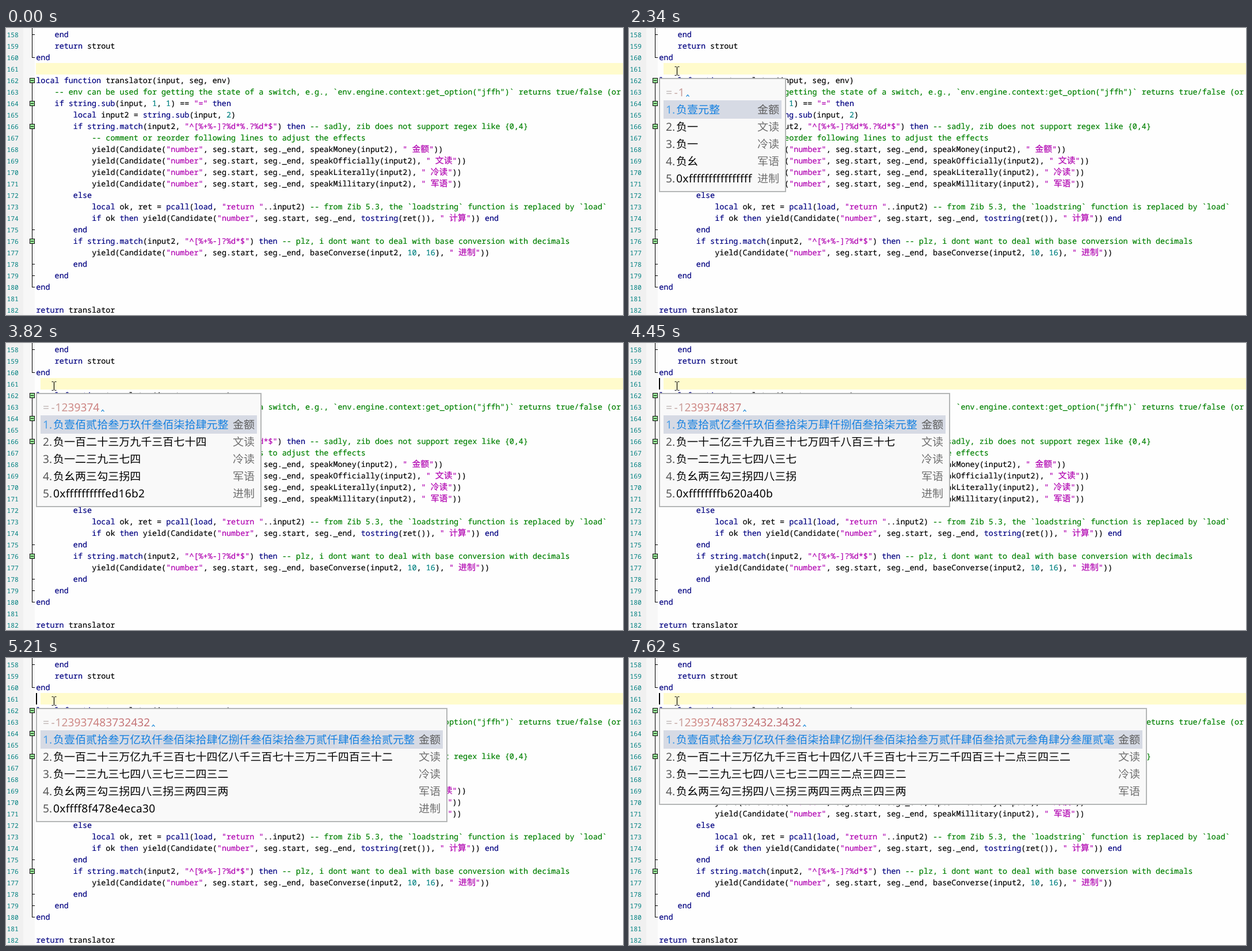
Recreate the animation shown at these times as an HTML page. Size 1072 by 500 pixels, loop 8000 ms.

```html
<!DOCTYPE html>
<html lang="zh-CN">
<head>
<meta charset="utf-8">
<title>Number translator</title>
<style>
  html, body { margin: 0; width: 100%; height: 100%; overflow: hidden; background: #fefefe; }
  svg { display: block; width: 1072px; height: 500px; }
  text { white-space: pre; text-rendering: geometricPrecision; }
  .code { font: 13.45px "Noto Sans Mono", "DejaVu Sans Mono", monospace; color: #000; }
  .code, .code tspan { fill: currentColor; stroke: currentColor; stroke-width: .2; }
  .num { font: 11.3px "Noto Sans Mono", "DejaVu Sans Mono", monospace; fill: #008080; }
  .han { font: 14.9px "Noto Sans CJK SC", "Noto Sans CJK", sans-serif; }
  .key { color: #000080; }
  .str { color: #b000b0; }
  .com { color: #008000; }
  .val { color: #008080; }
  .pop { font: 19.2px "Noto Sans", "Open Sans", sans-serif; }
  .cand { font: 19.04px "Noto Sans CJK SC", "Noto Sans CJK", sans-serif; }
  .hex { letter-spacing: .27px; }
</style>
</head>
<body>
<svg viewBox="0 0 1072 500" xmlns="http://www.w3.org/2000/svg">
  <defs>
    <linearGradient id="ink" gradientUnits="userSpaceOnUse" x1="64" y1="0" x2="300" y2="0">
      <stop offset="0" stop-color="#bcbcbc"/>
      <stop offset=".07" stop-color="#c4a8a4"/>
      <stop offset=".2" stop-color="#d08a86"/>
      <stop offset="1" stop-color="#bc646c"/>
    </linearGradient>
  </defs>
  <rect width="1072" height="500" fill="#fefefe"/>
  <rect width="30" height="500" fill="#f0f0f0"/>
  <rect x="30" width="20" height="500" fill="#f7f7f7"/>
  <rect x="52" y="61" width="1020" height="20" fill="#fffbcc"/>
  <g id="fold"></g>
  <g id="code"></g>
  <rect id="cell" x="52" y="61" width="8" height="20" fill="#fefefe"/>
  <rect id="caret" x="52" y="61" width="2" height="20"/>
  <g id="popup"></g>
  <path id="mouse" d="M-4 -7.5h3M1 -7.5h3M0 -7V7M-4 7.5h3M1 7.5h3" fill="none" stroke="#000" stroke-width="1.2"/>
</svg>
<script>
const LOOP = 8000, FIRST = 158, COL = 8.07, LEFT = 52.3;
const $ = id => document.getElementById(id);
const esc = s => s.replace(/&/g, '&amp;').replace(/</g, '&lt;');

const SOURCE = `    end
    return strout
end

local function translator(input, seg, env)
    -- env can be used for getting the state of a switch, e.g., \`env.engine.context:get_option("jffh")\` returns true/false (or
    if string.sub(input, 1, 1) == "=" then
        local input2 = string.sub(input, 2)
        if string.match(input2, "^[%+%-]?%d*%.?%d*$") then -- sadly, zib does not support regex like {0,4}
            -- comment or reorder following lines to adjust the effects
            yield(Candidate("number", seg.start, seg._end, speakMoney(input2), " 金额"))
            yield(Candidate("number", seg.start, seg._end, speakOfficially(input2), " 文读"))
            yield(Candidate("number", seg.start, seg._end, speakLiterally(input2), " 冷读"))
            yield(Candidate("number", seg.start, seg._end, speakMillitary(input2), " 军语"))
        else
            local ok, ret = pcall(load, "return "..input2) -- from Zib 5.3, the \`loadstring\` function is replaced by \`load\`
            if ok then yield(Candidate("number", seg.start, seg._end, tostring(ret()), " 计算")) end
        end
        if string.match(input2, "^[%+%-]?%d*$") then -- plz, i dont want to deal with base conversion with decimals
            yield(Candidate("number", seg.start, seg._end, baseConverse(input2, 10, 16), " 进制"))
        end
    end
end

return translator`.split('\n');

const TOKEN = /--.*|"[^"]*"|string\.\w+|\w+|\s+|[^\w\s"]/g;
const KEYWORD = /^(end|return|local|function|if|then|else|pcall|load|tostring|string\..*)$/;

function kind(tok) {
  if (tok.startsWith('--')) return 'com';
  if (tok[0] === '"') return 'str';
  if (/^\d+$/.test(tok)) return 'val';
  return KEYWORD.test(tok) ? 'key' : '';
}

function paint(tok) {
  const body = esc(tok).replace(/[\u4e00-\u9fff]+/g, '<tspan class="han">$&</tspan>');
  const cls = kind(tok);
  return cls ? `<tspan class="${cls}">${body}</tspan>` : body;
}

$('code').innerHTML = SOURCE.map((line, i) => {
  const text = line.trimStart(), y = 16 + 20 * i;
  const x = LEFT + (line.length - text.length) * COL;
  return `<text class="num" x="1.5" y="${y}">${FIRST + i}</text>` +
    `<text class="code" x="${x}" y="${y}">${(text.match(TOKEN) || []).map(paint).join('')}</text>`;
}).join('');

// Fold margin: two stems, ticks at block ends, boxes at block starts
const mid = n => 11.5 + 20 * (n - FIRST);
$('fold').innerHTML =
  `<path d="M45.5 0V${mid(160)}M45.5 ${mid(162)}V${mid(180)}` +
  [158, 160, 175, 178, 179, 180].map(n => `M45 ${mid(n)}h5`).join('') +
  '" fill="none" stroke="#000"/>' +
  [162, 164, 166, 176].map(n =>
    `<rect x="41.5" y="${mid(n) - 4}" width="8" height="8" fill="#98e898" stroke="#000"/>` +
    `<path d="M43 ${mid(n)}h5" stroke="#000"/>`).join('');

// Number readings
const PLAIN = '零一二三四五六七八九', FORMAL = '零壹贰叁肆伍陆柒捌玖', RADIO = '洞幺两三四五六拐八勾';
const GROUP = ['', '万', '亿', '万亿'];
const spell = (s, names) => [...s].map(d => names[d]).join('');

function grouped(s, names, units) {
  return [...s].map((d, i) => {
    const p = s.length - 1 - i;
    return names[d] + units[p % 4] + (p % 4 ? '' : GROUP[p / 4]);
  }).join('');
}

function readings(num) {
  const [whole, frac] = num.split('.');
  const dot = names => frac === undefined ? '' : '点' + spell(frac, names);
  const coins = frac ? [...frac].map((d, i) => FORMAL[d] + '角分厘毫'[i]).join('') : '整';
  const rows = [
    ['负' + grouped(whole, FORMAL, ['', '拾', '佰', '仟']) + '元' + coins, '金额'],
    ['负' + grouped(whole, PLAIN, ['', '十', '百', '千']) + dot(PLAIN), '文读'],
    ['负' + spell(whole, PLAIN) + dot(PLAIN), '冷读'],
    ['负' + spell(whole, RADIO) + dot(RADIO), '军语']
  ];
  if (frac === undefined) rows.push(['0x' + BigInt.asUintN(64, -BigInt(whole)).toString(16), '进制']);
  return rows;
}

function candidates(typed) {
  if (typed === '=') return [['=', '〔半角〕']];
  if (typed === '=-') return [['负元整', '金额']];
  return readings(typed.slice(2));
}

const hexWidth = s => [...s.slice(2)].reduce((w, c) => w + (c === 'f' ? 7.1 : 11), 19.4);
const width = s => s.startsWith('0x') ? hexWidth(s) : s.length * 19;

function popup(typed) {
  if (!typed) return '';
  const rows = candidates(typed), digits = typed.slice(2);
  const right = typed === '=' ? 212 : 140 + Math.round(Math.max(...rows.map(r => width(r[0]))));
  const bottom = 136 + 30 * rows.length;
  const end = typed.length < 2 ? 78 : 85.5 + [...digits].reduce((w, c) => w + (c === '.' ? 5 : 11), 0);
  let out = `<rect x="53" y="88" width="${right - 54}" height="${bottom - 89}" fill="#f9f9f9" stroke="#b4b6b6" stroke-width="2"/>` +
    `<rect x="60" y="126" width="${right - 68}" height="32" fill="#d6dae4"/>` +
    `<text class="pop" y="119" fill="url(#ink)"><tspan x="64">=</tspan>` +
    (typed.length > 1 ? `<tspan x="78.5">-</tspan><tspan x="85.5">${digits}</tspan>` : '') + '</text>' +
    `<path d="M${end + 3} 119.5l2.5 -3l2.5 3" fill="none" stroke="#2a90dc" stroke-width="1.2"/>`;
  rows.forEach(([text, note], i) => {
    const y = 149 + 30 * i;
    const latin = text.charCodeAt(0) < 128;
    out += `<text class="pop" x="64" y="${y}" fill="${i ? '#555' : '#4a9ee8'}">${i + 1}.</text>` +
      `<text class="${latin ? 'pop hex' : 'cand'}" x="82" y="${y}" fill="${i ? '#000' : '#1580e0'}">${text}</text>` +
      `<text class="cand" x="${right - 12}" y="${y}" text-anchor="end" fill="${i ? '#707070' : '#5c5c5c'}">${note}</text>`;
  });
  return out;
}

// Timeline: [ms, keys typed], caret toggles, [ms, x, y] of the pointer
const KEYS = '=-123937483732432.3432';
const TYPING = [[0, 0], [1330, 1], [1790, 2], [2340, 3], [2660, 4], [2810, 5], [3040, 6], [3270, 7],
  [3580, 8], [3820, 9], [4140, 10], [4360, 11], [4440, 12], [4660, 13], [4740, 14], [5140, 16],
  [5210, 17], [6450, 18], [6930, 19], [7180, 20], [7390, 21], [7620, 22]];
const BLINKS = [620, 1090, 1790, 2340, 2890, 3420, 3970, 4510, 4970];
const POINTER = [[0, -50, -50], [70, 231.5, 14], [150, 172.5, 34], [230, 122.5, 55], [310, 90.5, 69],
  [390, 77.5, 73], [540, 86.5, 76], [620, 83.5, 75]];

const at = (table, t) => table.filter(s => s[0] <= t).pop();
const show = (id, on) => $(id).setAttribute('visibility', on ? 'visible' : 'hidden');
let shown = -1;

function draw(t) {
  const n = at(TYPING, t)[1];
  if (n !== shown) {
    $('popup').innerHTML = popup(KEYS.slice(0, n));
    $('caret').setAttribute('width', n ? 2 : 1);
    show('cell', n > 0);
    shown = n;
  }
  show('caret', BLINKS.filter(b => b <= t).length % 2);
  const [, x, y] = at(POINTER, t);
  $('mouse').setAttribute('transform', `translate(${x} ${y})`);
}

const start = performance.now();
function tick() {
  draw((performance.now() - start) % LOOP);
  requestAnimationFrame(tick);
}
tick();
</script>
</body>
</html>
```
